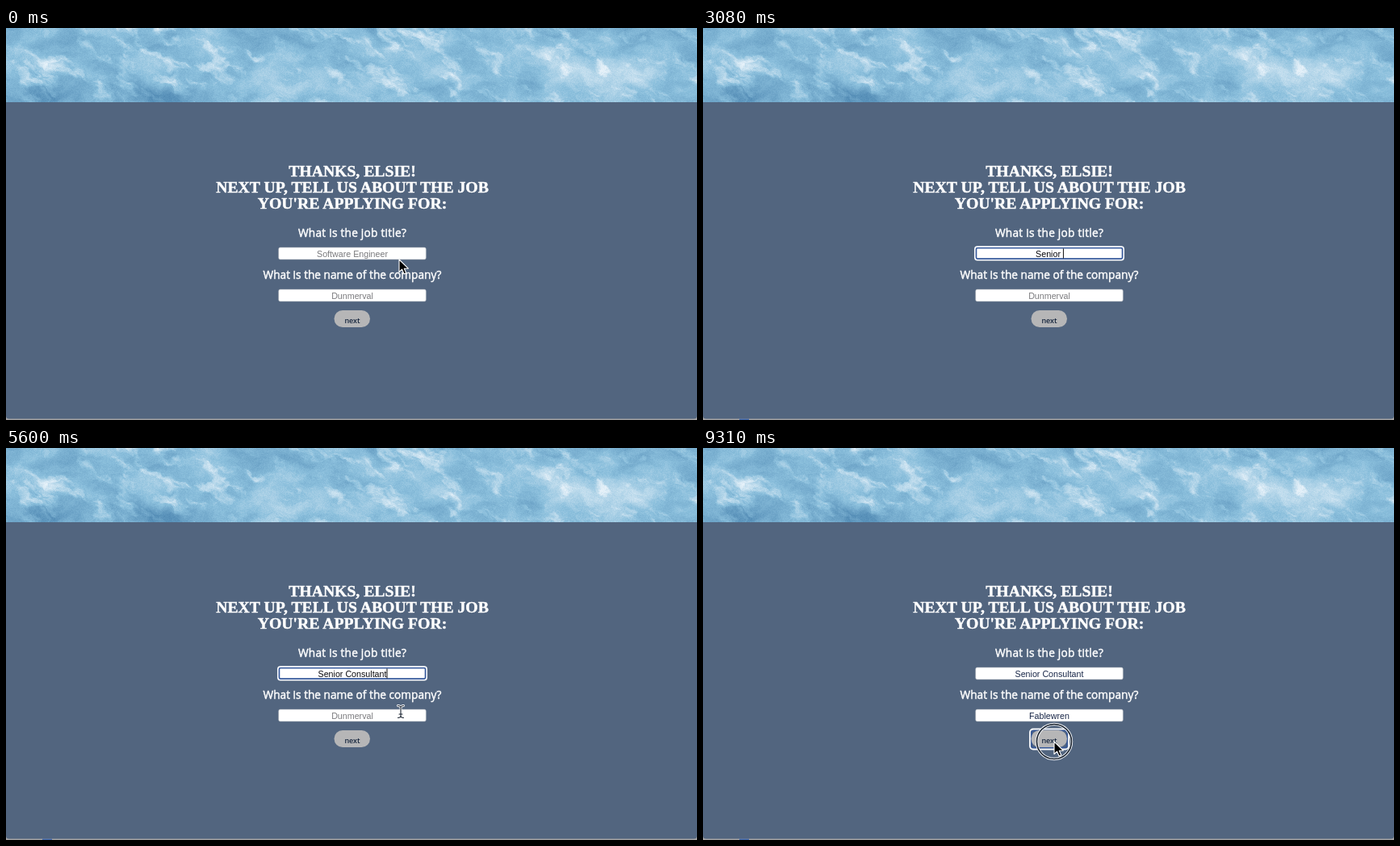
Write an HTML page with a canvas that moves like this. It is 856 px wide and 486 px high and loops after 9.38 s.

```html
<!DOCTYPE html>
<html lang="en">
<head>
<meta charset="utf-8">
<title>Job form</title>
<style>
  html, body { margin: 0; width: 100%; height: 100%; overflow: hidden; background: #52657f; }
  canvas, svg { position: absolute; left: 0; top: 0; display: block; }
  text { text-anchor: middle; white-space: pre; }
  .title { font: bold 19.7px "Liberation Serif", serif; fill: #fff; stroke: #fff; stroke-width: .45px; }
  .label { font: 13.7px "Open Sans", sans-serif; fill: #fff; stroke: #fff; stroke-width: .45px; }
  .short { letter-spacing: .24px; }
  .value { font: 10.7px "Liberation Sans", Arial, sans-serif; }
  .next { font: 600 9px "Open Sans", sans-serif; fill: #14243c; }
  .halo { fill: none; stroke: #fafcff; stroke-width: 1.8px; }
  .glow { fill: none; stroke: #35589b; stroke-width: 1.6px; }
</style>
</head>
<body>
<canvas id="water" width="856" height="92"></canvas>
<svg width="856" height="486" viewBox="0 0 856 486">
  <path d="M0 481Q0 484.5 4 484.5H852Q856 484.5 856 481V486H0Z" fill="#a5a3a3"/>
  <rect id="dock" x="45" y="484.5" width="12" height="1.5" fill="#3f66a8"/>
  <g class="title">
    <text x="429" y="184">THANKS, ELSIE!</text>
    <text x="429" y="204">NEXT UP, TELL US ABOUT THE JOB</text>
    <text x="429" y="224">YOU'RE APPLYING FOR:</text>
  </g>
  <text class="label short" x="429" y="258.5">What is the job title?</text>
  <text class="label" x="429" y="310.5">What is the name of the company?</text>
  <g id="fields"></g>
  <g id="buttonFocus">
    <rect class="halo" x="405" y="348.5" width="48" height="25" rx="4"/>
    <rect class="glow" x="407" y="350.5" width="44" height="21" rx="3"/>
  </g>
  <rect x="406.5" y="350" width="44.5" height="21" rx="10.5" fill="#b6b6b7"/>
  <text class="next" x="429" y="365.5">next</text>
  <g id="pointer">
    <g id="ring" fill="none">
      <circle r="21.5" stroke="#f2f4f7" stroke-width="3.4"/>
      <circle r="21.5" stroke="#17202c" stroke-width="1.6"/>
    </g>
    <path id="arrow" d="M0 0V15.5L3.6 12.2L6.1 18L8.8 16.8L6.3 11.2H11.3Z"
          fill="#000" stroke="#fff" stroke-width="1.1" stroke-linejoin="round"/>
    <g id="beam" fill="none" stroke-linecap="round">
      <path id="beamLine" d="M-3.5 -7.5Q0 -7.5 0 -5V5Q0 7.5 -3.5 7.5M3.5 -7.5Q0 -7.5 0 -5V5Q0 7.5 3.5 7.5M-2 3H2"
            stroke="#fff" stroke-width="2.8"/>
      <use href="#beamLine" style="display:none"/>
    </g>
  </g>
</svg>
<script>
const LOOP = 9380, STEP = 70, CENTER = 429, KEY_GAP = 140, CLICK_TIME = 140;
const TITLE_CLICK = 980, TITLE_TYPE = 2170, COMPANY_CLICK = 5880, COMPANY_TYPE = 6580, NEXT_CLICK = 9170;

const $ = id => document.getElementById(id);
const show = (node, on) => { node.style.display = on ? '' : 'none'; };
const clamp = (v, lo, hi) => Math.min(hi, Math.max(lo, v));
const mix = (a, b, k) => a + (b - a) * k;
const smooth = k => k * k * (3 - 2 * k);

function add(parent, tag, attrs) {
  const node = document.createElementNS(parent.namespaceURI, tag);
  for (const name in attrs) node.setAttribute(name, attrs[name]);
  return parent.appendChild(node);
}

// Sea surface: layered noise drifting down to the right, with a few foam and shadow patches.
function hash(x, y) {
  let n = Math.imul(x, 374761393) + Math.imul(y, 668265263);
  n = Math.imul(n ^ (n >>> 13), 1274126177);
  return ((n ^ (n >>> 16)) >>> 0) / 4294967295;
}
function noise(x, y) {
  const i = Math.floor(x), j = Math.floor(y), u = smooth(x - i), v = smooth(y - j);
  return mix(mix(hash(i, j), hash(i + 1, j), u), mix(hash(i, j + 1), hash(i + 1, j + 1), u), v);
}
function fbm(x, y) {
  let sum = 0;
  for (let o = 0, a = .5; o < 5; o++, a *= .55, x *= 2.03, y *= 2.03) sum += a * noise(x + o * 17, y);
  return sum;
}
const patches = [ // x, y, strength
  [155, 30, .12], [365, 62, .2], [500, 38, .1], [685, 52, .24], [775, 62, .2],
  [190, 88, -.34], [45, 84, -.24]
];
function patchLight(x, y) {
  let sum = 0;
  for (const [px, py, strength] of patches) {
    const dx = x - px, dy = y - py - dx * .25;
    sum += strength * Math.exp(-((dx / 52) ** 2) - (dy / 19) ** 2);
  }
  return sum;
}
function paintWater() {
  const ctx = $('water').getContext('2d'), image = ctx.createImageData(856, 92);
  const deep = [80, 137, 179], light = [139, 191, 220], foam = [230, 241, 249];
  for (let y = 0, p = 0; y < 92; y++) for (let x = 0; x < 856; x++, p += 4) {
    const wx = x + 18 * (fbm(x / 22, y / 18) - .55), wy = y + 18 * (fbm(x / 22 + 50, y / 18) - .55);
    const swell = fbm((wx + wy) / 42, (wy - wx * .35) / 22) - .54;
    const spray = Math.max(0, fbm(wx / 24 + 80, (wy - wx * .4) / 13) - .56);
    const v = clamp(.47 + patchLight(wx, wy) + .55 * swell + 1.3 * spray + .1 * (hash(x + 900, y) - .5), 0, 1);
    const [from, to, k] = v < .5 ? [deep, light, v * 2] : [light, foam, v * 2 - 1];
    for (let c = 0; c < 3; c++) image.data[p + c] = mix(from[c], to[c], k);
    image.data[p + 3] = 255;
  }
  ctx.putImageData(image, 0, 0);
}

function makeField(y, hint, word, focusAt, blurAt, typeAt) {
  const root = $('fields');
  add(root, 'rect', { x: 337.7, y: y + .1, width: 182.6, height: 14.8, rx: 2, fill: '#fff', stroke: '#a9afb8', 'stroke-width': .6 });
  const focus = add(root, 'g', {});
  add(focus, 'rect', { class: 'halo', x: 336.9, y: y - .8, width: 184.2, height: 16.4, rx: 3 });
  add(focus, 'rect', { class: 'glow', x: 338.5, y: y + .7, width: 181, height: 13.4, rx: 1.5 });
  const text = add(root, 'text', { class: 'value', x: CENTER, y: y + 11.5 });
  const caret = add(root, 'rect', { y: y + 1.5, width: 1, height: 12, fill: '#111' });
  return t => {
    const count = clamp(Math.floor((t - typeAt) / KEY_GAP) + 1, 0, word.length);
    const focused = t >= focusAt && t < blurAt;
    const since = t - (count ? typeAt + (count - 1) * KEY_GAP : focusAt);
    text.textContent = count ? word.slice(0, count) : hint;
    text.style.fill = !count ? '#7b7b7e' : focused ? '#0b0b10' : '#1a2849';
    caret.setAttribute('x', CENTER + (count ? text.getComputedTextLength() / 2 : .5));
    show(focus, focused);
    show(caret, focused && since % 1000 < 500);
  };
}
const fields = [
  makeField(272, 'Software Engineer', 'Senior Consultant', TITLE_CLICK, COMPANY_CLICK, TITLE_TYPE),
  makeField(324, 'Dunmerval', 'Fablewren', COMPANY_CLICK, NEXT_CLICK, COMPANY_TYPE)
];

const moves = [
  { start: 210, end: 700, x: 495, y: 272 },
  { start: 4970, end: 5460, x: 489, y: 327 },
  { start: 8050, end: 8750, x: 435, y: 364 }
];
function pointerAt(t) {
  let x = 487, y = 287;
  for (const move of moves) {
    const k = smooth(clamp((t - move.start) / (move.end - move.start), 0, 1));
    x = mix(x, move.x, k);
    y = mix(y, move.y, k);
  }
  return [x, y];
}
// The pointer hides while typing, until it moves again.
const isTyping = t => (t >= TITLE_TYPE && t < moves[1].start) || (t >= COMPANY_TYPE && t < moves[2].start);

function draw(time) {
  const t = Math.floor((time % LOOP) / STEP) * STEP;
  fields.forEach(update => update(t));
  const [x, y] = pointerAt(t);
  const isArrow = (y >= 287 && y < 298) || y >= 340;
  $('pointer').setAttribute('transform', `translate(${x} ${y})`);
  show($('pointer'), !isTyping(t));
  show($('arrow'), isArrow);
  show($('beam'), !isArrow);
  show($('ring'), t >= NEXT_CLICK || [TITLE_CLICK, COMPANY_CLICK].some(at => t >= at && t < at + CLICK_TIME));
  show($('buttonFocus'), t >= NEXT_CLICK);
  show($('dock'), t >= STEP);
}

// Dark core of the text pointer over its white outline.
const core = $('beamLine').cloneNode();
core.removeAttribute('id');
core.setAttribute('stroke', '#1b2431');
core.setAttribute('stroke-width', 1.1);
$('beam').querySelector('use').replaceWith(core);

paintWater();
const began = performance.now();
function tick() {
  draw(performance.now() - began);
  requestAnimationFrame(tick);
}
tick();
</script>
</body>
</html>
```
